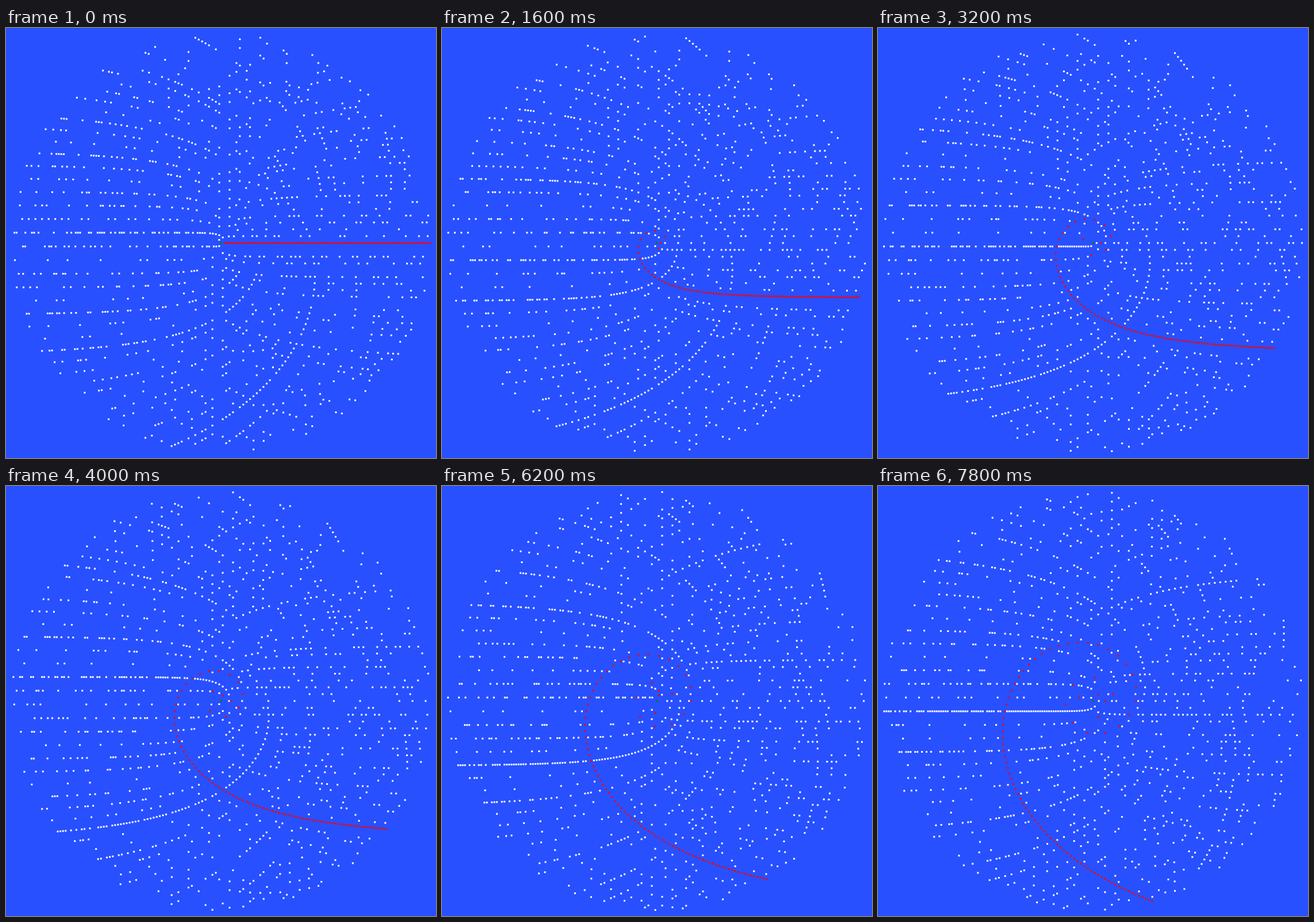
Animation, 748 px wide and 748 px high, one loop 8000 ms. Source, as an HTML page with a canvas:

```html
<!DOCTYPE html>
<html lang="en">
<head>
<meta charset="utf-8">
<title>Prime spiral</title>
<style>
  html, body { margin: 0; width: 100%; height: 100%; overflow: hidden; background: #2850ff; }
  canvas { display: block; width: 748px; height: 748px; }
</style>
</head>
<body>
<canvas id="stage" width="748" height="748"></canvas>
<script>
const ctx = document.getElementById("stage").getContext("2d");
const SIZE = 748, CENTER = SIZE / 2, DOT = 3;
const RINGS = 96, STEPS = 40, STEP_MS = 200;
const COUNT = RINGS * RINGS;
const LIMIT = COUNT + STEPS;

const composite = new Uint8Array(LIMIT);
composite[0] = composite[1] = 1;
for (let p = 2; p * p < LIMIT; p++) {
  if (composite[p]) continue;
  for (let n = p * p; n < LIMIT; n += p) composite[n] = 1;
}

// Ring k holds 2k + 1 evenly spaced places, counted anticlockwise from the right.
const places = [];
for (let k = 1; k < RINGS; k++) {
  const size = 2 * k + 1;
  const radius = 3.8 * k + 2.55;
  for (let j = 0; j < size; j++) {
    const angle = 2 * Math.PI * j / size;
    places[k * k + j] = [
      CENTER + radius * Math.cos(angle),
      CENTER - radius * Math.sin(angle)
    ];
  }
}

function dot(x, y, color) {
  ctx.fillStyle = color;
  ctx.fillRect(x - DOT / 2, y - DOT / 2, DOT, DOT);
}

// The number at the centre is `start`; the rest follow along the spiral.
function draw(start) {
  ctx.fillStyle = "#2850ff";
  ctx.fillRect(0, 0, SIZE, SIZE);
  for (let i = 1; i < COUNT; i++) {
    if (!composite[i + start]) dot(...places[i], "#fff");
  }
  for (let k = 1; k * k < COUNT + start; k++) {
    const i = k * k - start;
    if (i > 0) dot(...places[i], "#f00");
  }
  dot(CENTER, CENTER, "#008000");
}

let shown = -1;
function tick() {
  const step = Math.floor(performance.now() / STEP_MS) % STEPS;
  if (step !== shown) draw(shown = step);
  requestAnimationFrame(tick);
}
tick();
</script>
</body>
</html>
```
